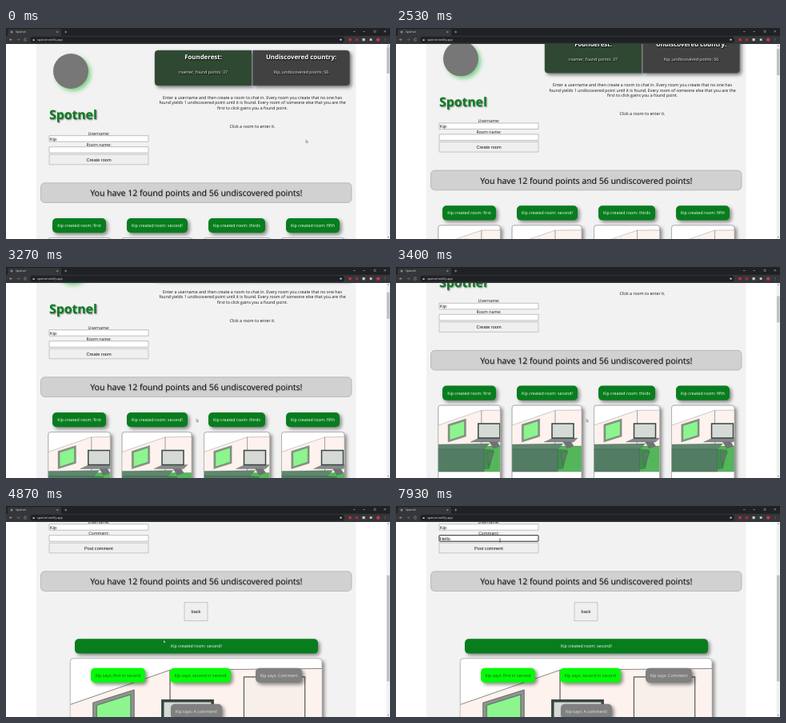
These frames come from a looping animation (480 by 264 pixels, 8 s). An HTML page with a canvas:

```html
<!DOCTYPE html>
<html lang="en">
<head>
<meta charset="utf-8">
<title>Spotnel</title>
<style>
  html, body { margin: 0; width: 100%; height: 100%; overflow: hidden; background: #fff; }
  canvas { display: block; width: 480px; height: 264px; }
</style>
</head>
<body>
<canvas id="stage"></canvas>
<script>
const LOOP = 8000, OPEN_ROOM = 4200, FOCUS = 5670;
const SANS = '"Open Sans", sans-serif', ARIAL = '"Liberation Sans", Arial, sans-serif';
const GREEN = '#087d1e', USER = 'Kip', APP = 'Spotnel';

const canvas = document.getElementById('stage');
const ctx = canvas.getContext('2d');
const dpr = window.devicePixelRatio || 1;
canvas.width = 480 * dpr;
canvas.height = 264 * dpr;

const clamp = v => Math.max(0, Math.min(1, v));
const ease = v => { v = clamp(v); return v * v * (3 - 2 * v); };

function withShadow(shadow, draw) {
  ctx.save();
  if (shadow) {
    const [offset, blur, color] = shadow;
    ctx.shadowOffsetX = ctx.shadowOffsetY = offset * dpr;
    ctx.shadowBlur = blur * dpr;
    ctx.shadowColor = color;
  }
  draw();
  ctx.restore();
}

function box(x, y, w, h, fill, { r = 0, stroke, line = 0.5, shadow, dash = [] } = {}) {
  ctx.beginPath();
  ctx.roundRect(x, y, w, h, r);
  ctx.fillStyle = fill;
  withShadow(shadow, () => ctx.fill());
  if (!stroke) return;
  ctx.setLineDash(dash);
  ctx.strokeStyle = stroke;
  ctx.lineWidth = line;
  ctx.stroke();
  ctx.setLineDash([]);
}

function text(str, x, y, { size = 5.25, color = '#111', font = SANS, weight = 400, align = 'center', shadow } = {}) {
  ctx.font = `${weight} ${size}px ${font}`;
  ctx.textRendering = 'geometricPrecision';
  ctx.textAlign = align;
  ctx.fillStyle = color;
  withShadow(shadow, () => ctx.fillText(str, x, y));
}

function shape(points, fill, stroke, line = 0.3, close = true) {
  ctx.beginPath();
  points.forEach(([x, y]) => ctx.lineTo(x, y));
  if (close) ctx.closePath();
  if (fill) { ctx.fillStyle = fill; ctx.fill(); }
  if (stroke) { ctx.strokeStyle = stroke; ctx.lineWidth = line; ctx.stroke(); }
}

function dot(x, y, r, fill, shadow) {
  ctx.beginPath();
  ctx.arc(x, y, r, 0, 7);
  ctx.fillStyle = fill;
  withShadow(shadow, () => ctx.fill());
}

// Each wheel notch glides the page by 28 px.
const NOTCHES = [2450, 2950, 3290, 3340];
const scrollAt = t => NOTCHES.reduce((sum, start) => sum + 28 * ease((t - start) / 150), 0);

const MOUSE = [
  [70, 375, 141], [1550, 177.5, 164], [1850, 177.5, 164], [2400, 239, 192], [3500, 238, 191],
  [4000, 201, 175], [4800, 201, 175], [5330, 120, 50], [5600, 125, 42.5], [6300, 126, 42.5], [7930, 130, 43]
];
function mouseAt(t) {
  const i = MOUSE.findIndex(([time]) => time > t);
  if (i === 0) return MOUSE[0].slice(1);
  if (i < 0) return MOUSE.at(-1).slice(1);
  const [t0, x0, y0] = MOUSE[i - 1], [t1, x1, y1] = MOUSE[i];
  const k = ease((t - t0) / (t1 - t0));
  return [x0 + (x1 - x0) * k, y0 + (y1 - y0) * k];
}

const KEYS = [7270, 7600, 7800, 7870, 7930];
const typedAt = t => 'Hello'.slice(0, KEYS.filter(time => t >= time).length);

function input(y, value, focused, caret) {
  box(54, y, 124, 7.5, '#fff', { stroke: focused ? '#111' : '#858585', line: focused ? 0.9 : 0.5, r: focused ? 0.5 : 0 });
  const style = { size: 5.6, font: ARIAL, align: 'left' };
  text(value, 55, y + 5.8, style);
  if (caret) box(55.2 + ctx.measureText(value).width, y + 1.2, 0.4, 5.2, '#222');
}

function button(x, y, w, h, label) {
  box(x, y, w, h, '#efefef', { stroke: '#999' });
  text(label, x + w / 2, y + h / 2 + 2, { size: 5.6, font: ARIAL });
}

function pill(x, y, w, label, fill = GREEN, color = '#fff') {
  box(x, y, w, 18.3, fill, { r: 5, shadow: [2.5, 4, 'rgba(0,0,0,.45)'] });
  text(label, x + w / 2, y + 11, { color });
}

function room(x, y, scale, w, h) {
  ctx.save();
  ctx.beginPath();
  ctx.roundRect(x, y, w, h, 3);
  ctx.clip();
  ctx.translate(x, y);
  ctx.scale(scale, scale);
  const ink = '#555';
  shape([[0, 25], [54, 6.3], [137, 5.5], [137, 83], [0, 83]], '#fdf2ed');
  shape([[0, 25], [54, 6.3], [137, 5.5]], null, ink, 0.3, false);
  shape([[54, 6.3], [54, 51]], null, ink);
  shape([[0, 53], [54, 51], [137, 51], [137, 83], [0, 83]], '#54b65a', ink);
  shape([[94, 10], [127, 10], [127, 46], [94, 46]], '#f8efeb', ink, 0.5);
  shape([[12.3, 24], [34.6, 17], [34.6, 39], [12.3, 46]], '#8d958f', '#444');
  shape([[14.3, 25.4], [32.7, 19.6], [32.7, 37.5], [14.3, 43.5]], '#8cf58e', '#444');
  shape([[40, 46], [51, 41], [82, 41], [77, 46]], '#85888a', ink);
  shape([[64, 46], [74, 46], [77, 51], [69, 54]], '#707376', ink);
  shape([[50, 23], [77, 23], [77, 41], [50, 41]], '#d6dad7', '#394640', 1.5);
  shape([[57, 55], [69, 56], [64, 79], [57, 80]], '#438c51', '#38583f');
  shape([[61, 58], [70, 58], [63, 76]], '#56805f', '#38583f');
  shape([[0, 49], [64, 48], [57, 55], [0, 55]], '#60866f', '#395643');
  shape([[0, 55], [57, 55], [57, 83], [0, 83]], '#527c63', '#395643');
  ctx.restore();
}

function scoreCard(x, fill, radii, title, line) {
  box(x, 28, 121, 44, fill, { r: radii, stroke: '#566058', shadow: [2.5, 4, 'rgba(0,0,0,.5)'] });
  const mid = x + 60.5, shadow = [0.7, 1, '#000'];
  text(title, mid, 38.8, { size: 7.875, weight: 700, color: '#fff', shadow });
  text(line, mid, 57, { color: '#e8e8e8', shadow });
}

function topOfPage(t) {
  const inRoom = t >= OPEN_ROOM, focused = t >= FOCUS;
  const typed = typedAt(t);
  const caret = focused && (typed ? t < 7930 : (t - FOCUS) % 1000 < 500);

  dot(81, 54, 22, '#777', [3, 5, 'rgba(50,190,70,.6)']);
  text(APP, 54, 114, { size: 15.75, weight: 700, color: GREEN, align: 'left', shadow: [1, 1.5, 'rgba(0,0,0,.5)'] });
  scoreCard(186, '#2e4831', [4, 0, 0, 4], 'Founderest:', 'roamer, found points: 37');
  scoreCard(308.5, '#414141', [0, 4, 4, 0], 'Undiscovered country:', USER + ', undiscovered points: 56');

  text('Enter a username and then create a room to chat in. Every room you create that no one has', 308, 88.7);
  text('found yields 1 undiscovered point until it is found. Every room of someone else that you are the', 308, 95.3);
  text('first to click gains you a found point.', 308, 101.9);
  text('Click a room to enter it.', 308, 124.7);

  text('Username:', 116, 133.6);
  input(134.7, USER);
  text(inRoom ? 'Comment:' : 'Room name:', 116, 147.6);
  input(148.7, typed, focused, caret);
  button(54, 158.2, 124, 12.6, inRoom ? 'Post comment' : 'Create room');

  box(43.5, 193.8, 388.5, 24.7, '#d1d1d1', { r: 5, stroke: '#929292' });
  text('You have 12 found points and 56 undiscovered points!', 237.7, 210.4,
    { size: 10.5, shadow: [0.6, 1, 'rgba(0,0,0,.35)'] });
}

function roomList(t) {
  const rooms = [['first', 52.8, 77.5, 58, 67], ['second!', 145, 87, 151, 76],
                 ['thirds', 247.5, 82, 253, 71], ['fifth', 344.5, 78.5, 350, 67]];
  rooms.forEach(([name, x, w, pillX, pillW], i) => {
    const hover = i === 1 && t > 3800;
    const style = { r: 3, stroke: hover ? '#28a03a' : '#a5a5a5', line: 0.6 };
    pill(pillX, 238, pillW, `${USER} created room: ${name}`);
    box(x, 262.5, w, 97.5, '#fff', { ...style, shadow: [3, 4, 'rgba(0,0,0,.45)'] });
    room(x, 262.5, 1, w, 97.5);
    box(x, 262.5, w, 97.5, 'transparent', { ...style, dash: hover ? [1, 0.7] : [] });
  });
  [[65, 87], [185, 86], [306, 104]].forEach(([x, w]) => pill(x, 373.7, w, ''));
}

function roomView() {
  button(223, 232.7, 29, 23, 'back');
  pill(86, 278.3, 304, `${USER} created room: second!`);
  const frame = { r: 4, stroke: '#aaa' };
  box(80.3, 302.7, 314.7, 225, '#fff', { ...frame, shadow: [3, 4, 'rgba(0,0,0,.45)'] });
  room(80.3, 302.7, 2.31, 314.7, 225);
  box(80.3, 302.7, 314.7, 225, 'transparent', frame);
  const say = (x, y, w, words, found) =>
    pill(x, y, w, `${USER} says: ${words}`, found ? '#05fb09' : '#808080', found ? '#17591a' : '#e6e6e6');
  say(106, 314.7, 68, 'first in second', true);
  say(205, 314.7, 76, 'second in second', true);
  say(312, 314.7, 58, 'Comment');
  say(206, 359.7, 64, 'A comment!');
}

function scrollbar(scroll, inRoom) {
  box(475.5, 20, 4.5, 244, '#f1f1f1');
  const ratio = inRoom ? 0.56 : 0.139;
  box(476, 24 + scroll * ratio, 3.6, 237 * ratio, '#c1c1c1');
  shape([[476.8, 22.5], [477.8, 21.3], [478.8, 22.5]], '#555');
  shape([[476.8, 261.3], [477.8, 262.5], [478.8, 261.3]], '#555');
}

function browserBar() {
  const light = '#c8cacd', line = (...points) => shape(points, null, light, 0.5, false);
  box(0, 0, 480, 20, '#202124');
  box(2, 1.2, 67, 10, '#35363a', { r: 2 });
  box(0, 9.7, 480, 10.2, '#35363a');
  dot(7, 5, 1.5, '#888');
  text(APP, 12, 6.3, { size: 3.6, color: '#dcdde0', align: 'left' });
  line([63.3, 4], [65.3, 6]); line([65.3, 4], [63.3, 6]);
  line([73.2, 5], [76.2, 5]); line([74.7, 3.5], [74.7, 6.5]);
  line([434, 4.5], [436.5, 4.5]);
  line([446.5, 4.5], [449, 4.5]);
  box(460, 3.2, 2.2, 2.2, 'transparent', { stroke: light, line: 0.4 });
  line([472.5, 3], [475, 5.5]); line([475, 3], [472.5, 5.5]);

  line([8, 14.6], [4.5, 14.6]); line([6, 13], [4.5, 14.6], [6, 16.2]);
  ctx.globalAlpha = 0.5;
  line([13.5, 14.6], [17, 14.6]); line([15.5, 13], [17, 14.6], [15.5, 16.2]);
  ctx.globalAlpha = 1;
  ctx.beginPath();
  ctx.arc(24.3, 14.6, 1.6, 0.5, 5.8);
  ctx.stroke();
  box(30, 10.8, 393, 7.8, '#202124', { r: 4 });
  box(33.6, 14.2, 2, 1.8, light);
  text('spotnel.netlify.app', 39, 15.9, { size: 3.7, color: '#e4e5e7', align: 'left' });
  dot(418.5, 14.6, 1.2, light);
  box(428.5, 13, 3.2, 3.2, '#d92b32');
  box(436.8, 13, 3.2, 3.2, '#a52c3b');
  box(445.5, 13, 3.2, 3.2, '#c9d1cc');
  box(454.7, 13.2, 2.8, 2.8, light);
  dot(465.2, 14.6, 2.2, '#d43344');
  [13.2, 14.6, 16].forEach(y => dot(474, y, 0.35, light));
}

function pointer(t) {
  const [x, y] = mouseAt(t);
  const overLink = (t > 1500 && t < 1900) || (t > 3850 && t < OPEN_ROOM);
  if (t > 5500) {
    shape([[x, y - 2], [x, y + 2]], null, '#333', 0.4);
    shape([[x - 0.7, y - 2], [x + 0.7, y - 2]], null, '#333', 0.4);
    shape([[x - 0.7, y + 2], [x + 0.7, y + 2]], null, '#333', 0.4);
  } else if (overLink) {
    box(x - 0.4, y - 1, 0.9, 3, '#fff', { r: 0.4, stroke: '#333', line: 0.4 });
    box(x - 1, y + 0.8, 3, 2.5, '#fff', { r: 0.7, stroke: '#333', line: 0.4 });
  } else {
    shape([[x, y - 1], [x, y + 2.6], [x + 0.9, y + 1.8], [x + 1.5, y + 3], [x + 2, y + 2.7],
           [x + 1.5, y + 1.6], [x + 2.6, y + 1.5]], '#fff', '#333', 0.4);
  }
}

function draw(t) {
  const scroll = scrollAt(t), inRoom = t >= OPEN_ROOM;
  ctx.setTransform(dpr, 0, 0, dpr, 0, 0);
  box(0, 0, 480, 264, '#fff');
  box(38, 20, 399.5, 244, '#f2f2f2');
  ctx.save();
  ctx.translate(0, -scroll);
  topOfPage(t);
  inRoom ? roomView() : roomList(t);
  ctx.restore();
  scrollbar(scroll, inRoom);
  browserBar();
  pointer(t);
}

const start = performance.now();
function tick() {
  draw((performance.now() - start) % LOOP);
  requestAnimationFrame(tick);
}
tick();
</script>
</body>
</html>
```
